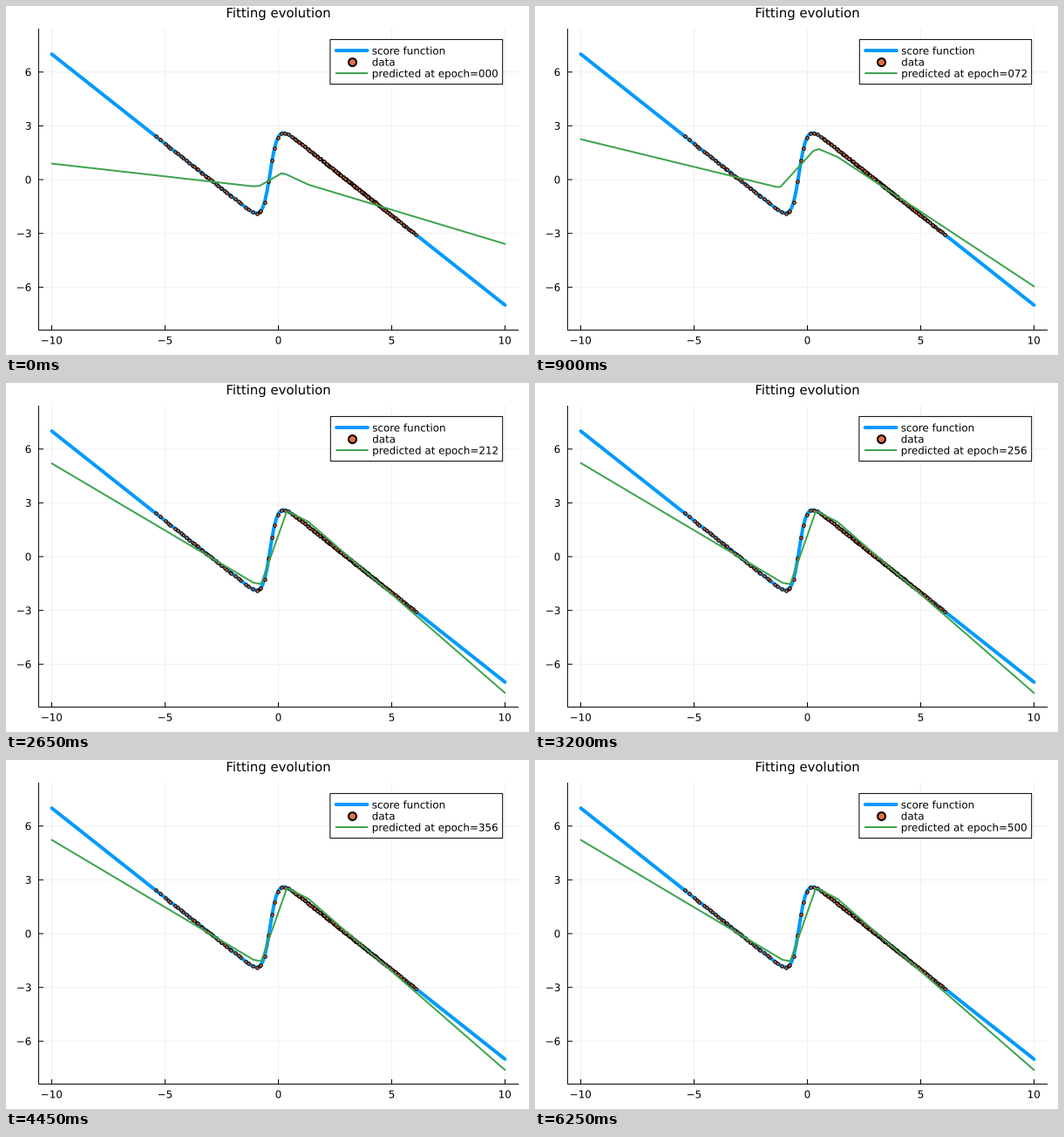
Recreate the animation shown at these times as a matplotlib script. Size 600 by 400 pixels, loop 6.3 s.

```python
import numpy as np
import matplotlib.pyplot as plt
from matplotlib.animation import FuncAnimation
from matplotlib.patches import PathPatch, Rectangle
from matplotlib.textpath import TextPath
from matplotlib.transforms import Affine2D

W, H, DPI = 600, 400, 100
PX = 72 / DPI  # points per pixel
FRAMES, INTERVAL, EPOCH_STEP = 126, 50, 4
BLUE, ORANGE, GREEN, GRID = "#009AFA", "#E26F46", "#3DA44E", "#F0F0F0"
LEFT, RIGHT, TOP, BOTTOM = 37.4, 588.2, 26, 371.4
SMALL, LARGE = 11.9, 14.9
plt.rcParams["font.family"] = "DejaVu Sans"


def to_x(v):
    return 312.5 + 26 * np.asarray(v)


def to_y(v):
    return 199 - 20.55 * np.asarray(v)


def score(x):
    """Score of the mixture 0.1 N(-3, 1) + 0.9 N(3, 1)."""
    return -x + 3 * np.tanh(3 * x + np.log(9) / 2)


def ease(epoch, centre, width):
    """Logistic step that starts exactly at 0."""
    s, s0 = (1 / (1 + np.exp((centre - e) / width)) for e in (epoch, 0))
    return (s - s0) / (1 - s0)


def fitted(epoch):
    """Bends of the fitted curve, in pixels: two valley, two peak, one knee."""
    dip = np.exp(-((epoch - 85) / 65) ** 2)
    rise = ease(epoch, 52, 32)
    drop = ease(epoch, 127, 17)
    return np.array([
        (to_x(-10), 180.6 - 89 * ease(epoch, 89, 24)),
        (284 - 7 * dip, 206.6 + 22.4 * drop),
        (292.8 - 11.5 * dip, 206.2 + 24.4 * drop),
        (316 + 6 * rise, 191.8 - 44.4 * rise),
        (320 + 5 * rise + 3 * dip, 192.5 - 44.7 * ease(epoch, 55, 24)),
        (347, 204.8 - 45.7 * ease(epoch, 60, 14)),
        (to_x(10), 272.7 + 82.6 * ease(epoch, 68, 11)),
    ]).T


def cluster(centre, n, linear, cubic):
    """Points that crowd around the centre."""
    u = np.linspace(-1, 1, n)
    return centre + linear * u + cubic * u ** 3


def sample_data():
    rng = np.random.default_rng(4)
    x = np.r_[cluster(-3.1, 38, 1.7, 0.6), cluster(-0.15, 9, 0.6, 0),
              cluster(3.3, 130, 1.7, 1.0)]
    return rng.permutation(x + rng.normal(0, 0.03, x.size))


fig = plt.figure(figsize=(W / DPI, H / DPI), dpi=DPI, facecolor="white")
ax = fig.add_axes([0, 0, 1, 1])
ax.set(xlim=(0, W), ylim=(H, 0))
ax.axis("off")
shift = Affine2D()  # moves the legend
legend = dict(transform=shift + ax.transData, zorder=4)


def line(x, y, color, width, **kw):
    kw = {"solid_capstyle": "round", "solid_joinstyle": "round",
          "snap": False, **kw}
    return ax.plot(x, y, color=color, lw=width * PX, **kw)[0]


def rule(x, y, color="black"):
    line(x, y, color, 1, solid_capstyle="butt", solid_joinstyle="miter")


def dots(x, y, size, edge, **kw):
    return ax.plot(x, y, "o", ms=size * PX, mew=edge * PX, mfc=ORANGE,
                   mec="black", snap=False, **kw)[0]


def glyphs(s, size=SMALL):
    return TextPath((0, 0), s, size=size)


def text(x, y, s, size=SMALL, align=0, transform=ax.transData, zorder=2):
    """Text at a baseline; align 0 is left, 0.5 centre, 1 right."""
    path = glyphs(s, size)
    if align:
        box = path.get_extents()
        x -= box.x0 + align * box.width
    place = Affine2D().scale(1, -1).translate(x, y) + transform
    return ax.add_patch(PathPatch(path, fc="black", lw=0, zorder=zorder,
                                  transform=place))


def label(v):
    return str(v).replace("-", "\u2212")


# Grid, ticks and axes
for v in range(-10, 11, 5):
    x = to_x(v)
    rule([x, x], [TOP, BOTTOM], GRID)
    rule([x, x], [BOTTOM, BOTTOM - 5.5])
    text(x, 387.4, label(v), align=0.5)
for v in range(-6, 7, 3):
    y = to_y(v)
    rule([LEFT, RIGHT], [y, y], GRID)
    rule([LEFT, LEFT + 5.5], [y, y])
    text(28.5, y + 4.4, label(v), align=1)
rule([LEFT, LEFT, RIGHT], [TOP, BOTTOM, BOTTOM])
text(312.6, 13, "Fitting evolution", LARGE, align=0.5)

# Series
xs = np.linspace(-10, 10, 201)
line(to_x(xs), to_y(score(xs)), BLUE, 4)
data = sample_data()
dots(to_x(data), to_y(score(data)), 3.5, 1)
curve = line([], [], GREEN, 2)

# Legend
frame = ax.add_patch(Rectangle((371.9, 38.4), 197.8, 51.2, fc="white",
                               ec="black", lw=PX, zorder=3, snap=False))
line([378.7, 414.5], [51, 51], BLUE, 4, **legend)
dots([396.6], [64], 9, 2, **legend)
line([378.7, 414.5], [77, 77], GREEN, 2, **legend)
text(419.8, 55.5, "score function", **legend)
text(419.8, 68.5, "data", **legend)
caption = text(419.8, 81.5, "predicted at epoch=000", **legend)
widest = caption.get_path().get_extents().x1


def update(i):
    epoch = i * EPOCH_STEP
    curve.set_data(*fitted(epoch))
    path = glyphs(f"predicted at epoch={epoch:03d}")
    caption.set_path(path) if hasattr(caption, "set_path") else None
    # The box hugs its text, so its left side follows the text width
    dx = widest - path.get_extents().x1
    shift.clear().translate(dx, 0)
    frame.set_x(371.9 + dx)
    frame.set_width(197.8 - dx)
    return [curve, caption, frame]


anim = FuncAnimation(fig, update, frames=FRAMES, interval=INTERVAL,
                     init_func=lambda: update(0), repeat=True,
                     repeat_delay=0, blit=False)
plt.show()
```
